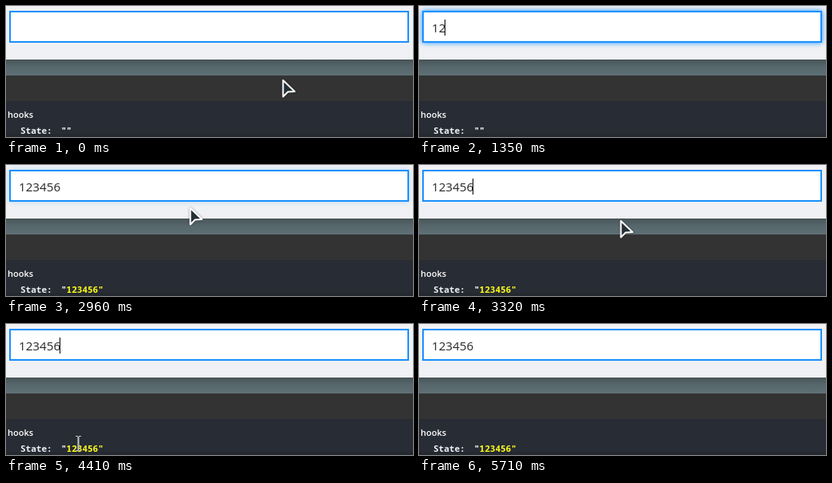
An HTML page with a canvas for the animation above (5780 ms loop, 509x164 px).

```html
<!DOCTYPE html>
<html lang="en">
<head>
<meta charset="utf-8">
<title>Deferred input</title>
<style>
  html, body { margin: 0; width: 509px; height: 164px; overflow: hidden; }
  canvas { display: block; }
</style>
</head>
<body>
<canvas id="stage" width="509" height="164"></canvas>
<script>
const ctx = document.getElementById('stage').getContext('2d');
const LOOP = 5780, TICK = LOOP / 86;
const FOCUS = 1080, BLUR = 5700, BLINK = 540;
const FIRST_KEY = 1150, KEY_GAP = 200;
const TEXT = '123456';
const SANS = '"Open Sans", "Noto Sans", sans-serif';
const MONO = '"Noto Sans Mono", "DejaVu Sans Mono", monospace';

const home = { x: 346, y: 91 };
const moves = [
  { from: 0, to: 470, x: 165, y: 41 },
  { from: 880, to: 1150, x: 163, y: 27 },
  { from: 2620, to: 3180, x: 266, y: 66 },
  { from: 3180, to: 3450, x: 230, y: 70 },
  { from: 3550, to: 4120, x: 90, y: 149 },
  { from: 4435, to: 4900, x: 505, y: 149 }
];

const ramp = (t, from, to) => Math.max(0, Math.min(1, (t - from) / (to - from)));
const ease = k => k * k * (3 - 2 * k);

function box(x, y, w, h, fill) {
  ctx.fillStyle = fill;
  ctx.fillRect(x, y, w, h);
}

function write(str, x, y, font, fill) {
  ctx.font = font;
  ctx.fillStyle = fill;
  ctx.fillText(str, x, y);
  return x + ctx.measureText(str).width;
}

// The pointer moves in ticks, like a screen recording
function pointerAt(t) {
  const tick = Math.floor(t / TICK + .4) * TICK;
  let { x, y } = home;
  for (const m of moves) {
    const k = ease(ramp(tick, m.from, m.to));
    x += (m.x - x) * k;
    y += (m.y - y) * k;
  }
  return [Math.round(x), Math.round(y)];
}

function drawArrow(x, y) {
  ctx.save();
  ctx.translate(x, y);
  ctx.beginPath();
  ctx.moveTo(.5, 2);
  ctx.lineTo(.5, 22.5);
  ctx.lineTo(6.5, 16.5);
  ctx.lineTo(15, 16);
  ctx.closePath();
  ctx.fillStyle = '#263238';
  ctx.strokeStyle = '#fff';
  ctx.lineWidth = 2;
  ctx.lineJoin = 'round';
  ctx.shadowColor = 'rgba(0,0,0,.3)';
  ctx.shadowBlur = 3;
  ctx.fill();
  ctx.stroke();
  ctx.restore();
}

function drawBeam(x, y, color, width) {
  box(x + .5 - width / 2, y - 8, width, 17, color);
  for (const edge of [y - 9, y + 9]) {
    box(x - 3, edge, 3, 1, color);
    box(x + 1, edge, 3, 1, color);
  }
}

function drawPage() {
  box(0, 0, 509, 67, '#f0f1f4');
  const shade = ctx.createLinearGradient(0, 67, 0, 87);
  shade.addColorStop(0, '#485559');
  shade.addColorStop(.5, '#57686d');
  shade.addColorStop(1, '#5e7075');
  box(0, 67, 509, 20, shade);
  box(0, 87, 509, 32, '#333');
  box(0, 119, 509, 45, '#282c34');
  box(0, 160, 509, 4, '#24282f');
}

function drawInput(t, count) {
  const glow = ramp(t, 230, 530) * (1 - ramp(t, 2710, 3060));
  ctx.save();
  ctx.shadowColor = `rgba(24,144,255,${glow})`;
  ctx.shadowBlur = 6.5;
  box(4, 6, 500, 40, '#1890ff');
  ctx.restore();
  box(6, 8, 496, 36, '#fff');
  const end = write(TEXT.slice(0, count), 16, 33, '15.2px ' + SANS, '#262626');

  // Each key restarts the caret blink
  const since = t - (count ? FIRST_KEY + KEY_GAP * (count - 1) : FOCUS);
  const lit = since >= 0 && t < BLUR && Math.floor(since / BLINK) % 2 === 0;
  if (lit) box(Math.floor(end - .5), 17, 1, 20, '#000');
}

function drawState(value) {
  const font = '600 11px ' + MONO;
  write('hooks', 2, 140, '600 11px ' + SANS, '#fff');
  write('State:', 18, 160, font, '#f0f4fa');
  const x = write('"', 69, 160, font, '#fff');
  write(value + '"', x, 160, font, value ? '#ffff1a' : '#fff');
}

function drawPointer(t) {
  const typing = t >= FIRST_KEY && t < 2420;
  if (typing || t >= 4900) return;
  const [x, y] = pointerAt(t);
  if (y < 46) drawBeam(x, y, '#444', 1);
  else if (y > 138 && x < 125) drawBeam(x, y, '#c4c6c8', 2);
  else drawArrow(x, y);
}

function frame(now) {
  const t = now % LOOP;
  const count = Math.floor(ramp(t, FIRST_KEY - KEY_GAP, FIRST_KEY + KEY_GAP * 5) * TEXT.length + 1e-6);
  const shown = t < 1650 ? 0 : t < 2690 ? 3 : 6;
  drawPage();
  drawInput(t, count);
  drawState(TEXT.slice(0, shown));
  drawPointer(t);
  requestAnimationFrame(frame);
}
requestAnimationFrame(frame);
</script>
</body>
</html>
```
